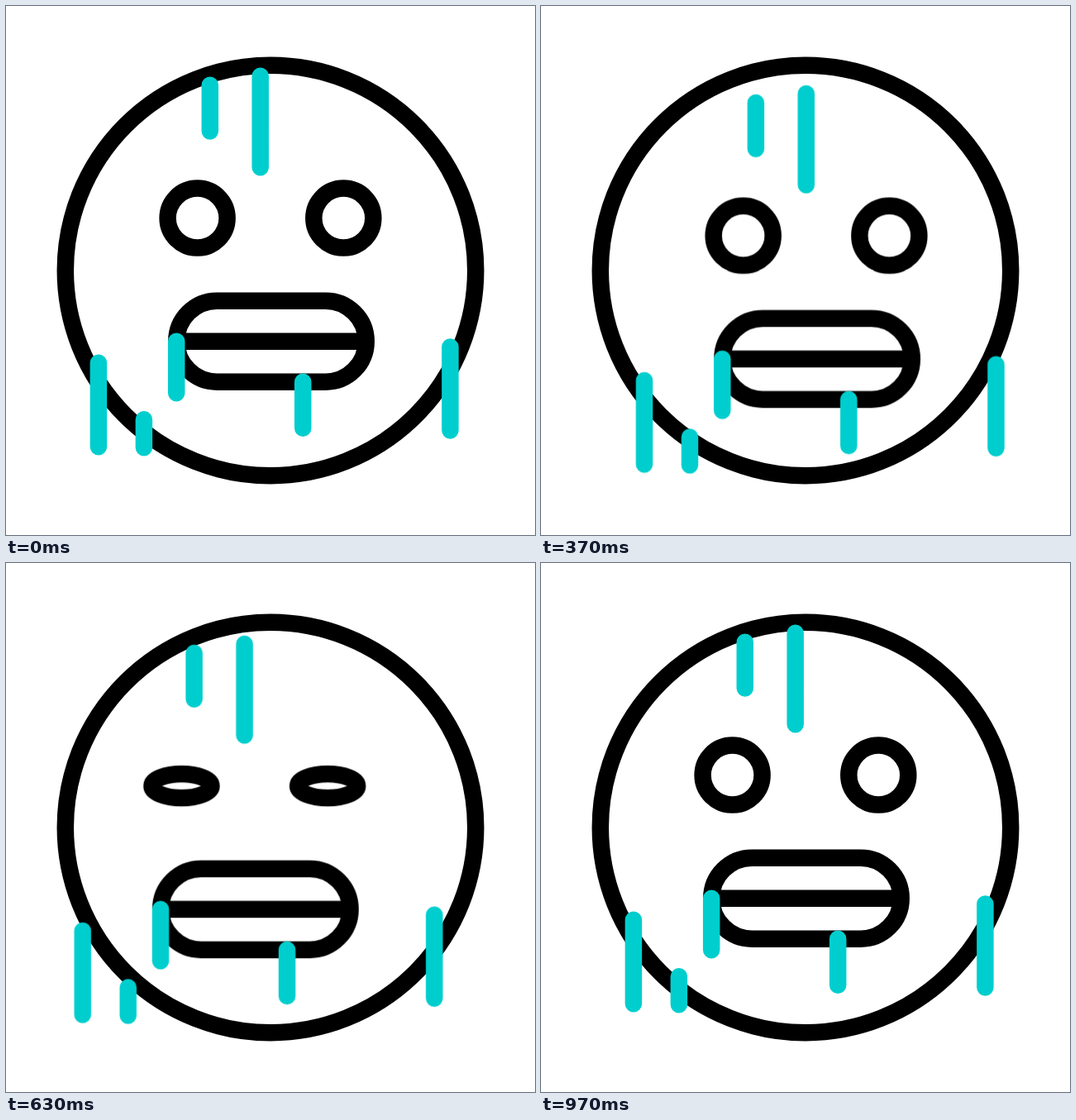
An HTML page without scripts that plays this animation: 640x640 px, repeating every 1670 ms.

```html
<!DOCTYPE html>
<html lang="en">
<head>
<meta charset="utf-8">
<title>Shivering face</title>
<style>
  html, body {
    margin: 0;
    width: 100%;
    height: 100%;
    overflow: hidden;
    background: #fff;
  }
  svg {
    display: block;
    width: 100%;
    height: 100%;
    fill: none;
    stroke: #000;
    stroke-width: 20.5;
  }
  .drops {
    stroke: #00cece;
    stroke-linecap: round;
  }
  /* 50 ticks per loop: 2% is one tick */
  .shiver, .eye {
    animation: shiver 1670ms -7ms infinite;
  }
  .eye {
    rx: 36px;
    ry: 36px;
    animation-name: blink;
  }
  @keyframes shiver {
    0%       { transform: translate(0, 0); animation-timing-function: step-end; }
    2%       { transform: translate(0, 0); animation-timing-function: steps(4); }
    10%      { transform: translate(-21.9px, 8.5px); animation-timing-function: steps(5); }
    20%      { transform: translate(15.4px, 12.6px); animation-timing-function: steps(2); }
    24%      { transform: translate(10.8px, 30px); animation-timing-function: steps(5); }
    34%      { transform: translate(-22.2px, 3.8px); animation-timing-function: steps(5); }
    44%      { transform: translate(-14.8px, 27.4px); animation-timing-function: steps(3); }
    50%      { transform: translate(-31.2px, 17.5px); animation-timing-function: steps(4); }
    58%, to  { transform: translate(0, 0); animation-timing-function: step-end; }
  }
  @keyframes blink {
    0%, 24%  { ry: 36px; animation-timing-function: steps(5); }
    34%      { ry: .2px; animation-timing-function: steps(5); }
    44%, to  { ry: 36px; }
  }
</style>
</head>
<body>
<svg viewBox="0 0 640 640">
  <circle cx="320" cy="320" r="248.2"/>
  <g class="shiver">
    <ellipse class="eye" cx="231.6" cy="256.6" rx="36" ry="36"/>
    <ellipse class="eye" cx="408.3" cy="256.6" rx="36" ry="36"/>
    <rect x="206.3" y="356.7" width="229.4" height="98" rx="49"/>
    <path d="M206.3 405.7H435.7"/>
    <path class="drops" d="M246.8 95.7V151.4M307.7 84.7V195.2M206.2 405.8V468.2M359.2 454.8V510.7M111.9 431.8V533.3M166.9 500.3V534.2M537.4 412.6V513.5"/>
  </g>
</svg>
</body>
</html>
```
